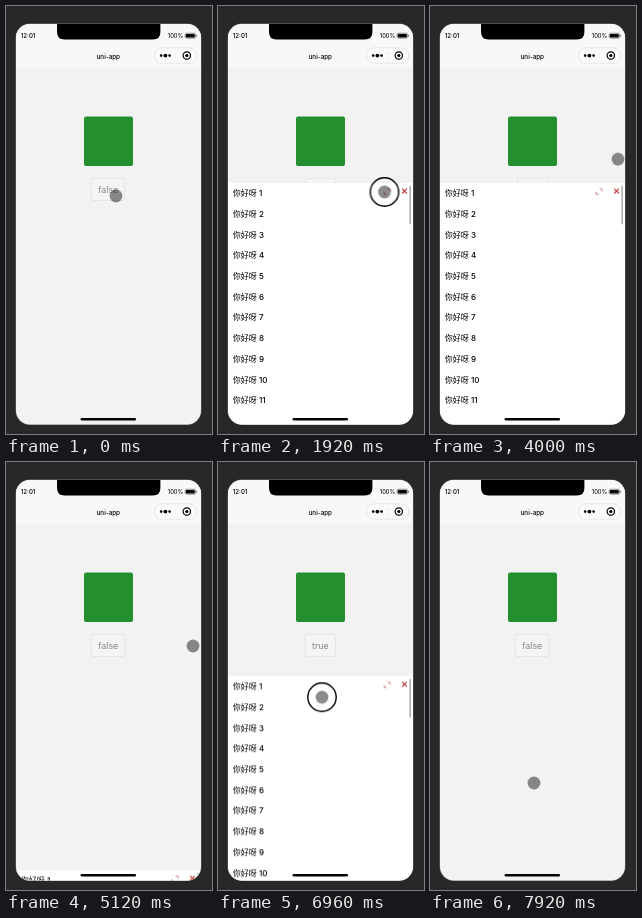
Write an HTML page that moves like this. It is 206 px wide and 428 px high and loops after 8 s.

```html
<!DOCTYPE html>
<html lang="zh-CN">
<head>
<meta charset="utf-8">
<title>Popup panel</title>
<style>
html, body { margin: 0; width: 100%; height: 100%; overflow: hidden; background: #282828; }
svg { display: block; width: 206px; height: 428px; }
text { font-family: Inter, "Noto Sans CJK SC", "Noto Sans CJK", sans-serif; fill: #000; }
.mid { text-anchor: middle; }
.button rect { fill: #f4f4f4; stroke: #e0e0e0; stroke-width: .8; }
.button text { font-size: 8.8px; fill: #858585; }
.row { font-size: 8px; font-weight: 500; }
.icon { fill: none; stroke: #c96868; stroke-width: .8; }
.close { stroke: #c23a3a; stroke-width: 1.1; }

/* One loop is 8 s, so 1% is 80 ms. */
.slide, .grow, .bar, .pointer, .ring, .on, .off, .inward, .outward {
  animation: 8s ease infinite;
}
.slide { animation-name: slide; }
.grow { animation-name: grow; }
.bar { animation-name: bar; }
.pointer { animation-name: pointer; animation-timing-function: ease-in-out; }
.ring { animation-name: ring; }
.on { animation-name: on; }
.off { animation-name: off; }
.inward { animation-name: inward; }
.outward { animation-name: outward; }
.ring, .on, .off, .inward, .outward { animation-timing-function: step-end; }

@keyframes slide {
  0%, 2% { transform: translateY(242px); }
  5.75%, 61.25% { transform: none; }
  65%, 73.6% { transform: translateY(242px); }
  77.35% { transform: none; }
  84.75% { transform: none; animation-timing-function: linear; }
  87% { transform: translateY(37px); animation-timing-function: ease-out; }
  95%, 95.5% { transform: translateY(123px); }
  99%, 100% { transform: translateY(242px); }
}
@keyframes grow {
  0%, 27% { transform: none; }
  30.75%, 41.75% { transform: translateY(-115px); }
  45.25%, 100% { transform: none; }
}
@keyframes bar {
  0%, 27% { height: 39px; }
  30.75%, 41.75% { height: 92px; }
  45.25%, 100% { height: 39px; }
}
@keyframes pointer {
  0%, 3% { transform: translate(110px, 190px); }
  5.5% { transform: translate(110px, 156px); }
  8%, 9.5% { transform: translate(109px, 190px); }
  19%, 31.5% { transform: translate(166.5px, 186px); }
  33% { transform: translate(167px, 164px); animation-timing-function: ease-out; }
  37%, 46% { transform: translate(169.5px, 75px); }
  50% { transform: translate(188px, 153px); animation-timing-function: ease-out; }
  54%, 55.5% { transform: translate(183px, 187.5px); }
  57%, 66.5% { transform: translate(187px, 184px); }
  71.5%, 77% { transform: translate(109px, 181px); }
  79% { transform: translate(103px, 168px); }
  82% { transform: translate(104px, 198px); }
  84.75% { transform: translate(104px, 198px); animation-timing-function: linear; }
  87% { transform: translate(104px, 235px); animation-timing-function: ease-out; }
  95%, 100% { transform: translate(104px, 321px); }
}
@keyframes ring {
  0% { opacity: 0; }
  1% { opacity: 1; }
  3% { opacity: 0; }
  24% { opacity: 1; }
  27% { opacity: 0; }
  38% { opacity: 1; }
  41.75% { opacity: 0; }
  60% { opacity: 1; }
  62% { opacity: 0; }
  72% { opacity: 1; }
  74% { opacity: 0; }
  84.75% { opacity: 1; }
  95.5%, 100% { opacity: 0; }
}
@keyframes on {
  0% { opacity: 0; }
  2% { opacity: 1; }
  61.25% { opacity: 0; }
  73.6% { opacity: 1; }
  95.5%, 100% { opacity: 0; }
}
@keyframes off {
  0% { opacity: 1; }
  2% { opacity: 0; }
  61.25% { opacity: 1; }
  73.6% { opacity: 0; }
  95.5%, 100% { opacity: 1; }
}
@keyframes inward {
  0% { opacity: 0; }
  27% { opacity: 1; }
  41.75%, 100% { opacity: 0; }
}
@keyframes outward {
  0% { opacity: 1; }
  27% { opacity: 0; }
  41.75%, 100% { opacity: 1; }
}
</style>
</head>
<body>
<svg viewBox="0 0 206 428">
  <defs>
    <clipPath id="screen"><rect x="10" y="18" width="185" height="400.6" rx="14"/></clipPath>
    <clipPath id="list"><rect x="10" y="62" width="185" height="340"/></clipPath>
  </defs>

  <rect x="9.6" y="17.6" width="185.8" height="401.4" rx="14.4" fill="#777"/>
  <g clip-path="url(#screen)">
    <rect x="10" y="18" width="185" height="401" fill="#f2f2f2"/>
    <rect x="10" y="18" width="185" height="43" fill="#f8f8f8"/>

    <path d="M51 17H154.4V26.1Q154.4 33.6 146.9 33.6H58.5Q51 33.6 51 26.1Z"/>
    <text x="14.8" y="31.8" font-size="6.1" font-weight="500">12:01</text>
    <text x="161.8" y="32" font-size="5.8">100%</text>
    <rect x="179" y="27.2" width="10.6" height="5" rx="1.4" fill="none" stroke="#555" stroke-width=".6"/>
    <rect x="179.8" y="28" width="9" height="3.4" rx=".7"/>
    <path d="M190.6 28.9v1.7" stroke="#555" stroke-width=".8"/>

    <text class="mid" x="102.3" y="53" font-size="6.3" font-weight="500">uni-app</text>
    <rect x="148.4" y="41.8" width="42.4" height="15.4" rx="7.7" fill="#fbfbfb" stroke="#dedede" stroke-width=".7"/>
    <path d="M169.7 45.5v8" stroke="#e6e6e6" stroke-width=".5"/>
    <circle cx="155.2" cy="49.6" r="1.3"/>
    <circle cx="159.4" cy="49.6" r="1.9"/>
    <circle cx="163.6" cy="49.6" r="1.3"/>
    <circle cx="180.8" cy="49.5" r="3.7" fill="none" stroke="#000" stroke-width="1.2"/>
    <circle cx="180.8" cy="49.5" r="1.6"/>

    <rect x="78" y="110.5" width="49" height="49.5" rx="2" fill="#238f2f"/>

    <g class="button off">
      <rect x="85.4" y="172.4" width="33.4" height="22.2" rx="2.2"/>
      <text class="mid" x="102.2" y="186.8">false</text>
    </g>
    <g class="button on">
      <rect x="87.2" y="172.4" width="30.2" height="22.2" rx="2.2"/>
      <text class="mid" x="102.3" y="186.8">true</text>
    </g>

    <g class="slide">
      <rect class="grow" x="10" y="177" width="185" height="400" fill="#fff"/>
      <g clip-path="url(#list)"><g class="grow" id="rows"></g></g>
      <g class="grow">
        <path class="icon outward" d="M169.6 182.9h2.5v2.5M168.6 188.3h-2.5v-2.5"/>
        <path class="icon inward" d="M166 184.4h2.4v-2M172.4 186.8h-2.4v2"/>
        <path class="close" d="M184.1 182.7l4.8 4.8m0-4.8l-4.8 4.8"/>
        <rect class="bar" x="191.3" y="179.4" width="1.7" height="39" rx=".85" fill="#b4b4b4"/>
      </g>
    </g>

    <rect x="74.6" y="411.9" width="55.4" height="2.7" rx="1.35"/>
  </g>

  <g class="pointer">
    <circle r="6.4" fill="#000" fill-opacity=".45"/>
    <circle class="ring" r="14.2" fill="none" stroke="#000" stroke-width="1.4"/>
  </g>
</svg>
<script>
const rows = document.getElementById("rows");
for (let i = 0; i < 18; i++) {
  const row = document.createElementNS("http://www.w3.org/2000/svg", "text");
  row.setAttribute("class", "row");
  row.setAttribute("x", 14.8);
  row.setAttribute("y", 190.2 + i * 20.7);
  row.textContent = `你好呀 ${i + 1}`;
  rows.append(row);
}
</script>
</body>
</html>
```
